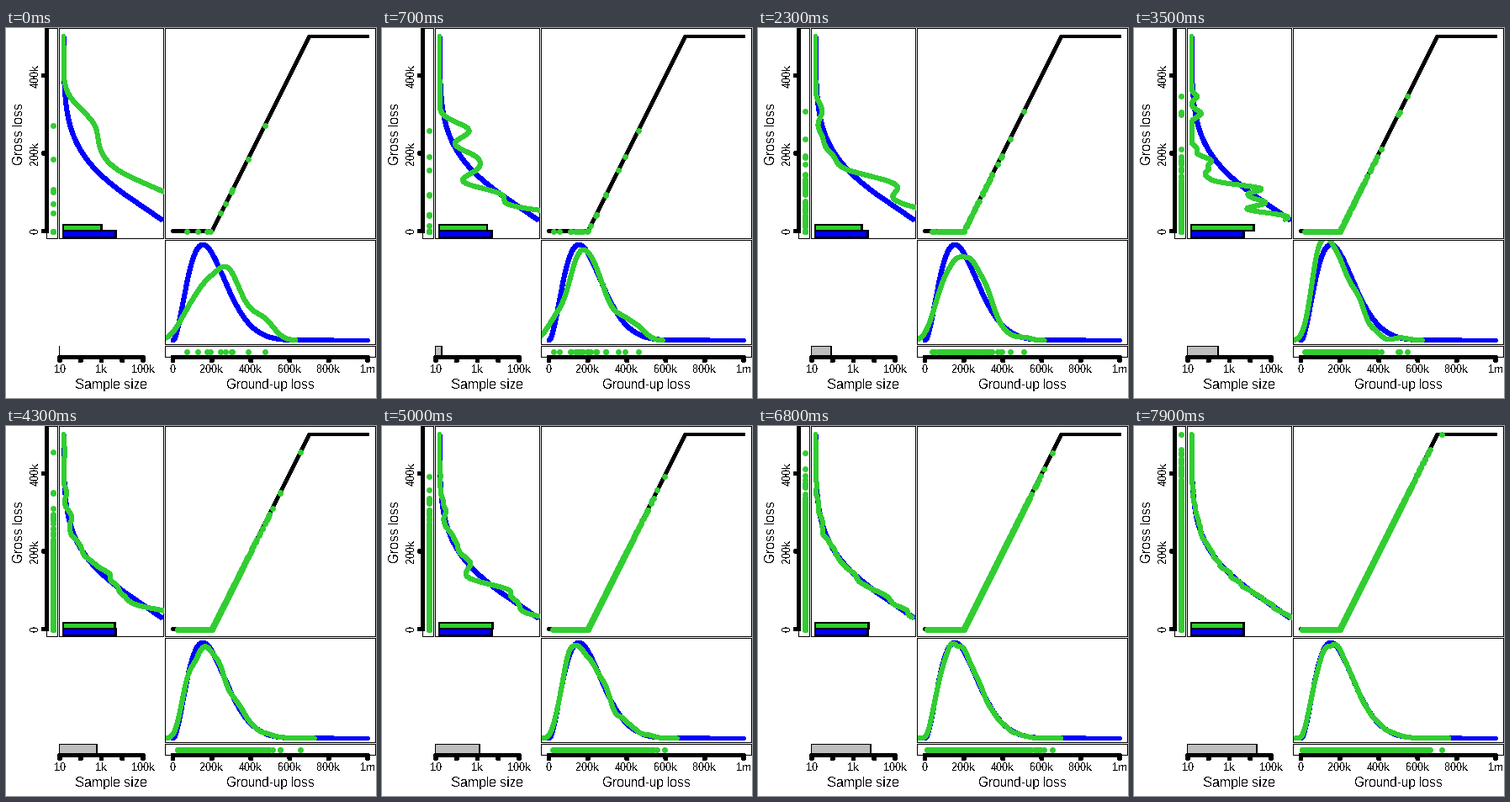
A matplotlib script that plays this animation: 440 px wide and 440 px high, repeating every 8 s.

```python
import numpy as np
import matplotlib.pyplot as plt
from matplotlib.animation import FuncAnimation
from matplotlib.patches import Rectangle

plt.rcParams.update({
    "font.family": "Liberation Sans",
    "text.antialiased": False,
    "text.hinting": "native",
    "text.hinting_factor": 1,
    "path.snap": False,
})

FRAMES, STEP = 80, 100
DPI = 80
PX = 72 / DPI                      # one pixel in points
GREEN, BLUE, GREY = "#32cd32", "#0000ff", "#bebebe"

# Losses are in millions and follow a beta distribution
A, B = 3, 12
RETENTION, LIMIT = 0.2, 0.5
BELOW = 0.552                      # chance of a loss under the retention
DECADES = 0.0421                   # growth of the sample per frame, in log10
DECADE_PX = 24.75
BAR_PX = 114


def loss_x(v):
    return 198 + 231.5 * np.asarray(v)


def gross_y(v):
    return 241 - 462.5 * np.asarray(v)


def density_y(d):
    return 371 - 27.7 * np.asarray(d)


def density_x(d):
    return 68 + 35.6 * np.asarray(d)


def beta_pdf(x):
    return 1092 * x ** (A - 1) * (1 - x) ** (B - 1)


def layer(x):
    return np.clip(x - RETENTION, 0, LIMIT)


def draw_losses(i):
    n = int(round(10 ** (1 + DECADES * i)))
    return np.random.default_rng(500 + i).beta(A, B, n)


def bandwidth(x):
    q1, q3 = np.percentile(x, [25, 75])
    sd = x.std(ddof=1)
    return 0.9 * (min(sd, (q3 - q1) / 1.34) or sd) * len(x) ** -0.2


def kde(x, grid, bw):
    values, count = np.unique(np.round(x, 4), return_counts=True)
    z = (grid[:, None] - values) / bw
    return np.exp(-z * z / 2) @ count / (len(x) * bw * np.sqrt(2 * np.pi))


fig = plt.figure(figsize=(440 / DPI, 440 / DPI), dpi=DPI, facecolor="white")
ax = fig.add_axes([0, 0, 1, 1])
ax.set_xlim(-0.5, 439.5)           # whole numbers fall on pixel centres
ax.set_ylim(439.5, -0.5)
ax.axis("off")


def box(x0, y0, x1, y1, fill="none", lw=1, z=1):
    r = Rectangle((x0, y0), x1 - x0, y1 - y0, facecolor=fill, edgecolor="black",
                  lw=lw * PX, antialiased=False, zorder=z)
    return ax.add_patch(r)


def stroke(x, y, color="black", w=5, z=2, clip=None):
    line, = ax.plot(x, y, color=color, lw=w * PX, antialiased=False, zorder=z,
                    solid_capstyle="round", solid_joinstyle="round")
    if clip is not None:
        line.set_clip_path(clip)
    return line


def dots():
    line, = ax.plot([], [], "o", color=GREEN, ms=7 * PX, mew=0,
                    antialiased=False, zorder=4)
    return line


def label(x, y, s, size=13, turn=0):
    ax.text(x, y, s, fontsize=size * PX, ha="center", va="baseline",
            rotation=turn, rotation_mode="anchor")


def tick_below(x, s):
    stroke([x, x], [391, 395])
    label(x, 409, s)


# Panels
box(48, 0, 61, 250)
side = box(63, 0, 187, 250)
box(189, 0, 439, 250)
low = box(189, 252, 439, 376)
box(189, 378, 439, 391)

# Axes
stroke([48, 48], [-6, 241])
for v, s in enumerate(["0", "200k", "400k"]):
    y = float(gross_y(v / 5))
    stroke([44, 48], [y, y])
    label(38, y, s, turn=90)
label(19, 125, "Gross loss", 16, 90)

stroke([198, 429.5], [391, 391])
for v, s in enumerate(["0", "200k", "400k", "600k", "800k", "1m"]):
    tick_below(float(loss_x(v / 5)), s)
label(314, 428, "Ground-up loss", 16)

stroke([63.5, 162.5], [391, 391])
for k, s in enumerate(["10", "", "1k", "", "100k"]):
    tick_below(63.5 + DECADE_PX * k, s)
label(125, 428, "Sample size", 16)

# Fixed curves
knees = np.array([0, RETENTION, RETENTION + LIMIT, 1])
stroke(loss_x(knees), gross_y(layer(knees)), w=3.5)
full = np.linspace(0, 1, 300)
stroke(loss_x(full), density_y(beta_pdf(full)), BLUE, clip=low)
tail = np.linspace(0.03, LIMIT, 260)
stroke(density_x(beta_pdf(RETENTION + tail)), gross_y(tail), BLUE, clip=side)
box(67.5, 240.5, 67.5 + BAR_PX * BELOW, 248.5, BLUE, 2, 5)

# Moving parts
zero_bar = box(67.5, 233.5, 67.5, 240.5, GREEN, 2, 5)
size_bar = box(63, 378, 63, 389, GREY, 1, 1)
low_curve = stroke([], [], GREEN, z=3, clip=low)
side_curve = stroke([], [], GREEN, z=3, clip=side)
on_line, on_side, on_low = dots(), dots(), dots()


def update(i):
    x = draw_losses(i)
    g = layer(x)

    bw = bandwidth(x)
    grid = np.linspace(x.min() - 3 * bw, x.max() + 3 * bw, 240)
    low_curve.set_data(loss_x(grid), density_y(kde(x, grid, bw)))
    side_curve.set_data(density_x(kde(g, tail, bandwidth(g))), gross_y(tail))

    seen = np.unique(np.round(x, 3))
    px, py = loss_x(seen), gross_y(layer(seen))
    on_line.set_data(px, py)
    on_side.set_data(np.full_like(py, 55), py)
    on_low.set_data(px, np.full_like(px, 384))

    zero_bar.set_width(BAR_PX * np.mean(g == 0))
    size_bar.set_width(DECADE_PX * DECADES * i)
    return low_curve, side_curve, on_line, on_side, on_low, zero_bar, size_bar


anim = FuncAnimation(fig, update, frames=FRAMES, interval=STEP,
                     repeat=True, repeat_delay=0, blit=False)
plt.show()
```
